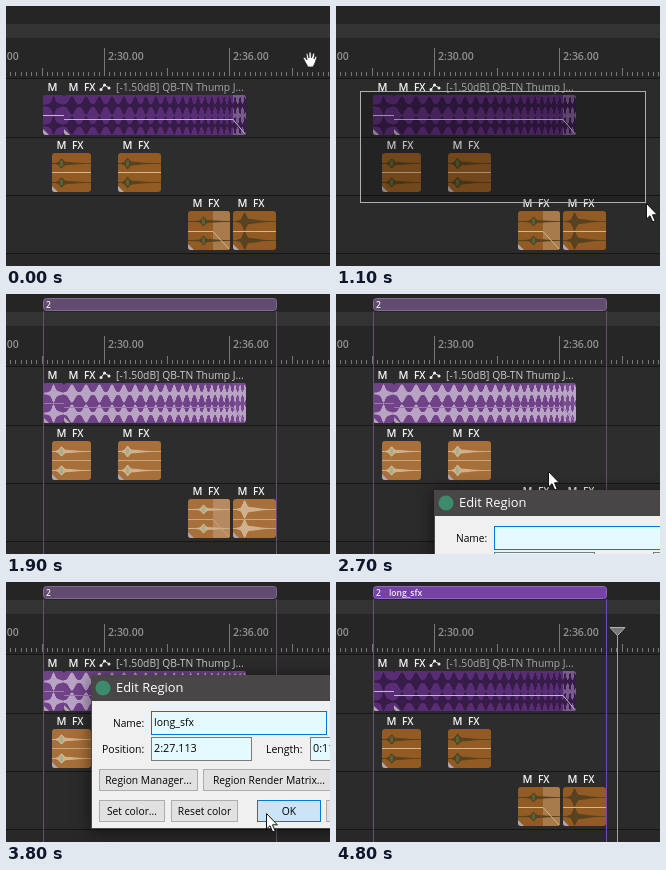
An HTML page with a canvas that plays this animation: 324 px wide and 260 px high, repeating every 6.2 s.

```html
<!DOCTYPE html>
<html lang="en">
<head>
<meta charset="utf-8">
<title>Create a region from items</title>
<style>
html, body { margin: 0; width: 100%; height: 100%; overflow: hidden; background: #2a2a2a; }
canvas { display: block; width: 324px; height: 260px; }
</style>
</head>
<body>
<canvas id="stage"></canvas>
<script>
const W = 324, H = 260, LOOP = 6200;
const canvas = document.getElementById('stage');
const ctx = canvas.getContext('2d');
const ratio = window.devicePixelRatio || 1;
canvas.width = W * ratio;
canvas.height = H * ratio;

// Each row: start time, then the values that hold until the next row.
const pointerSteps = [
  [0, 'hand', 304, 53], [100, 'hand', 290, 56], [200, 'hand', 236, 63],
  [300, 'arrow', 168, 78], [400, 'arrow', 100, 89], [500, 'arrow', 52, 91],
  [600, 'beam', 30, 89], [700, 'beam', 27, 87], [800, 'beam', 24, 85],
  [900, 'arrow', 84, 114], [1000, 'arrow', 216, 168], [1100, 'arrow', 310, 197],
  [1200, 'arrow', 306, 222], [1300, 'arrow', 289, 231], [1400, 'beam', 284, 231],
  [1500, 'beam', 281, 230], [1600, 'beam', 279, 229], [1900, 'none', 0, 0],
  [2700, 'arrow', 212, 177], [2800, 'arrow', 206, 205], [2900, 'arrow', 204, 189],
  [3000, 'arrow', 199, 152], [3100, 'arrow', 195, 119], [3200, 'arrow', 193, 104],
  [3300, 'arrow', 193, 102], [3400, 'none', 0, 0], [3500, 'arrow', 198, 130],
  [3600, 'beam', 222, 171], [3700, 'arrow', 246, 206],
  [3800, 'arrow', 260, 231], [3900, 'arrow', 260, 230], [4000, 'arrow', 260, 214],
  [4100, 'arrow', 268, 165], [4200, 'beam', 276, 95], [4300, 'hand', 279, 58],
  [4400, 'hand', 279, 53], [4600, 'hand', 281, 53], [4700, 'hand', 299, 53],
  [4800, 'none', 0, 0]
];
const dialogSteps = [
  [2700, 98, 196], [2900, 96, 180], [3000, 91, 143], [3100, 87, 110],
  [3200, 85, 95], [3300, 85, 93]
];
const typingSteps = [[0, ''], [3300, 'lo'], [3400, 'long_s'], [3500, 'long_sfx']];

const during = (t, from, to) => t >= from && t < to;
const valueAt = (steps, t) => steps.filter(s => s[0] <= t).pop().slice(1);

function box(x, y, w, h, fill, stroke) {
  if (fill) { ctx.fillStyle = fill; ctx.fillRect(x, y, w, h); }
  if (stroke) {
    ctx.strokeStyle = stroke;
    ctx.lineWidth = 1;
    ctx.strokeRect(x + .5, y + .5, w - 1, h - 1);
  }
}

function path(points, { fill, stroke, width = 1, close = false }) {
  ctx.beginPath();
  points.forEach(([x, y], i) => i ? ctx.lineTo(x, y) : ctx.moveTo(x, y));
  if (close) ctx.closePath();
  if (fill) { ctx.fillStyle = fill; ctx.fill(); }
  if (stroke) { ctx.strokeStyle = stroke; ctx.lineWidth = width; ctx.stroke(); }
}

function dot(x, y, r, fill) {
  ctx.beginPath();
  ctx.arc(x, y, r, 0, Math.PI * 2);
  ctx.fillStyle = fill;
  ctx.fill();
}

function label(text, x, y, size, color, weight = 400, align = 'left') {
  ctx.font = `${weight} ${size}px "Open Sans", "Noto Sans", sans-serif`;
  ctx.textAlign = align;
  ctx.fillStyle = color;
  ctx.fillText(text, x, y);
}

const palettes = {
  purple: {
    normal: { body: '#592d75', wave: '#371c49', line: '#c9b6d3', fade: '#795a8d' },
    chosen: { body: '#704389', wave: '#b9a3c5', line: '#9b7daf', fade: '#774d90' }
  },
  orange: {
    normal: { body: '#925b23', wave: '#58421f', line: '#d8b58c', fade: '#a87b4c' },
    chosen: { body: '#a76f39', wave: '#cfb18e', line: '#d0a478', fade: '#b58a60' }
  }
};

const bump = (x, center, width) => Math.exp(-(((x - center) / width) ** 2));
const puff = x => .7 + 6 * bump(x, 10, 2) + 2.5 * bump(x, 11, 6);
// Pulses whose spacing shrinks from 15 px to 4.5 px across the clip.
const rush = x => {
  const phase = 182 / 10.5 * Math.log(15 / (15 - 10.5 * x / 182));
  return 1.5 + 7.5 * Math.abs(Math.sin(Math.PI * phase)) ** 3;
};
const hit = (peak, power, tail) => x => x < 4 ? .5 :
  power * bump(x, peak, 2.5) + tail * bump(x, peak + 5, 11) + .4;

const clips = [
  { x: 37, y: 89, w: 21, h: 40, tone: 'purple', amp: puff, level: 20 },
  { x: 58, y: 89, w: 182, h: 40, tone: 'purple', amp: rush, level: 24, fade: 13, fx: true },
  { x: 46, y: 147, w: 39, h: 39, tone: 'orange', amp: hit(9, 3.5, 1.2), level: 19, fx: true, peak: 9 },
  { x: 112, y: 147, w: 43, h: 39, tone: 'orange', amp: hit(9, 4, 1.4), level: 19, fx: true, peak: 9 },
  { x: 182, y: 205, w: 42, h: 39, tone: 'orange', amp: hit(15, 3.5, .9), level: 20, fade: 17, fx: true, peak: 15 },
  { x: 227, y: 205, w: 43, h: 39, tone: 'orange', amp: hit(11, 7, 2), level: 20, fx: true }
];

function drawClip({ x, y, w, h, tone, amp, level, fade = 0, fx, peak }, chosen) {
  const c = palettes[tone][chosen ? 'chosen' : 'normal'];
  ctx.save();
  ctx.beginPath();
  ctx.roundRect(x, y, w, h, 3);
  ctx.clip();
  box(x, y, w, h, c.body);
  if (fade) box(x + w - fade, y, fade, h, c.fade);
  for (const cy of [y + 10.5, y + h - 9.5]) {
    ctx.fillStyle = c.wave;
    for (let i = 0; i < w; i++) {
      const a = Math.min(amp(i), 9.5);
      ctx.fillRect(x + i, cy - a, 1, 2 * a);
    }
    if (peak) box(x + peak - 1, cy - 3, 3, 6, chosen ? '#a4b28a' : '#566338');
  }
  const ly = y + level + .5;
  const points = [[x, ly], [x + w - fade, ly]];
  if (fade) points.push([x + w, y + h]);
  path(points, { stroke: c.line });
  path([[x, y + h - 6], [x + 6, y + h], [x, y + h]], { fill: '#b3a6b0', close: true });
  ctx.restore();
  label('M', x + 4.5, y - 4, 10.8, '#f4f4f4', 600);
  if (fx) label('FX', x + 20, y - 4, 10, '#f4f4f4', 600);
}

function drawBackdrop() {
  box(0, 0, W, H, '#2b2b2b');
  box(0, 0, W, 18, '#252525');
  box(0, 18, W, 14, '#333333');
  box(0, 32, W, 41, '#262626');
  for (let i = -18; i < 44; i++) {
    const tall = i % 12 === 0;
    box(Math.round(98 + i * 125 / 24), tall ? 62 : 66, 1, tall ? 8 : 4, '#777777');
  }
  for (const [x, text] of [[-27, '2:24.00'], [98, '2:30.00'], [223, '2:36.00']]) {
    box(x, 42, 1, 28, '#777777');
    label(text, x + 4, 54, 10.5, '#929292', 600);
  }
  box(0, 72, W, 1, '#151515');
  box(0, 132, W, 57, '#2d2d2d');
  for (const y of [131, 189, 247]) box(0, y, W, 1, '#161616');
  box(0, 248, W, 12, '#282828');
}

function drawClipTitle(chosen) {
  const nodes = [[95, 83.5], [98.5, 79], [103, 82]];
  path(nodes, { stroke: '#eeeeee' });
  nodes.forEach(([x, y]) => dot(x, y, 1.5, '#eeeeee'));
  label('[-1.50dB] QB-TN Thump J...', 110, 85, 10.3, chosen ? '#cccccc' : '#a9a9a9');
}

function drawRegion(bright, name) {
  box(37, 17, 1, 243, bright ? '#65556e' : '#664f71');
  box(270, 17, 1, 243, bright ? '#7848a5' : '#664f71');
  ctx.beginPath();
  ctx.roundRect(37.5, 4.5, 233, 12, 3);
  ctx.fillStyle = bright ? '#7542a5' : '#614c6f';
  ctx.fill();
  ctx.strokeStyle = bright ? '#9367bc' : '#826b90';
  ctx.lineWidth = 1;
  ctx.stroke();
  label('2', 40, 13.5, 8.5, '#f0eaf4', 600);
  label(name, 53, 13.5, 8.5, '#f0eaf4', 600);
}

function drawEditCursor() {
  box(281, 53, 1, 207, '#a0a0a0');
  path([[274, 45.5], [289, 45.5], [281.5, 53.5]], { fill: '#777777', stroke: '#b0b0b0', close: true });
}

function button(text, x, y, w, fill = '#e1e1e1', stroke = '#adadad') {
  box(x, y, w, 22, fill, stroke);
  label(text, x + w / 2, y + 15, 10.3, '#000000', 400, 'center');
}

function field(text, x, y, w, stroke, size = 10.8) {
  box(x, y, w, 24, '#e4faff', stroke);
  label(text, x + 3, y + 15, size, '#000000');
}

function drawDialog(t) {
  const [x, y] = valueAt(dialogSteps, t);
  const [name] = valueAt(typingSteps, t);
  ctx.save();
  ctx.translate(x, y);
  ctx.save();
  ctx.shadowColor = 'rgba(0,0,0,.55)';
  ctx.shadowBlur = 16 * ratio;
  ctx.shadowOffsetY = 2 * ratio;
  box(0, 0, 300, 154, '#f0f0f0');
  ctx.restore();
  box(0, 0, 300, 154, '#f0f0f0', '#4a4848');
  box(0, 0, 300, 26, '#484646');
  dot(12, 13, 7.5, '#3d8a6c');
  label('Edit Region', 25, 17, 12.9, '#ffffff');
  label('Name:', 22, 52, 10.2, '#000000');
  field(name, 60, 36, 176, '#0078d7', 10.5);
  label('Position:', 11, 78, 10.5, '#000000');
  field('2:27.113', 60, 62, 101, '#7a7a7a');
  label('Length:', 175, 78, 10.5, '#000000');
  field('0:11.200', 219, 62, 70, '#7a7a7a');
  button('Region Manager...', 8, 94, 99);
  button('Region Render Matrix...', 112, 94, 132);
  button('Set color...', 8, 125, 66);
  button('Reset color', 80, 125, 67);
  button('OK', 166, 125, 64, t >= 3800 ? '#cce4f7' : '#e1e1e1', '#0078d7');
  button('Cancel', 235, 125, 58);
  ctx.restore();
}

const pointers = {
  none() {},
  arrow() {
    path([[.5, .5], [.5, 16], [4, 12.7], [6.7, 19], [9.2, 18], [6.5, 11.8], [11.3, 11.8]],
      { fill: '#ffffff', stroke: '#111111', close: true });
  },
  beam() {
    const bar = [[.5, -6.5], [.5, 6.5]];
    const caps = [-7.5, 7.5].map(y => [[-2.5, y], [-.5, y], [.5, y * .87], [1.5, y], [3.5, y]]);
    for (const line of [bar, ...caps]) path(line, { stroke: '#e6e6e6' });
  },
  hand() {
    path([[-7, -1], [-5, -2], [-3, 1], [-4, -5], [-2.5, -6], [-1, -1], [-1, -7], [1, -7],
      [1.5, -1], [3, -6], [4.8, -5.5], [4, 0], [5.5, -3], [7, -2], [5, 4], [3, 8], [-2, 8]],
      { fill: '#ffffff', stroke: '#222222', width: .8, close: true });
  }
};

function draw(t) {
  ctx.setTransform(ratio, 0, 0, ratio, 0, 0);
  const [kind, px, py] = valueAt(pointerSteps, t);
  const chosen = during(t, 1400, 4600);
  drawBackdrop();
  clips.forEach(clip => drawClip(clip, chosen));
  drawClipTitle(chosen);
  if (during(t, 900, 1400)) box(24, 85, px - 24, py - 85, 'rgba(0,0,0,.22)', '#b0b0b0');
  if (t >= 1800) drawRegion(t >= 4300, t >= 4000 ? 'long_sfx' : '');
  if (t >= 4600) drawEditCursor();
  if (during(t, 2700, 4000)) drawDialog(t);
  ctx.save();
  ctx.translate(px, py);
  pointers[kind]();
  ctx.restore();
}

const start = performance.now();
function tick() {
  draw((performance.now() - start) % LOOP);
  requestAnimationFrame(tick);
}
tick();
</script>
</body>
</html>
```
